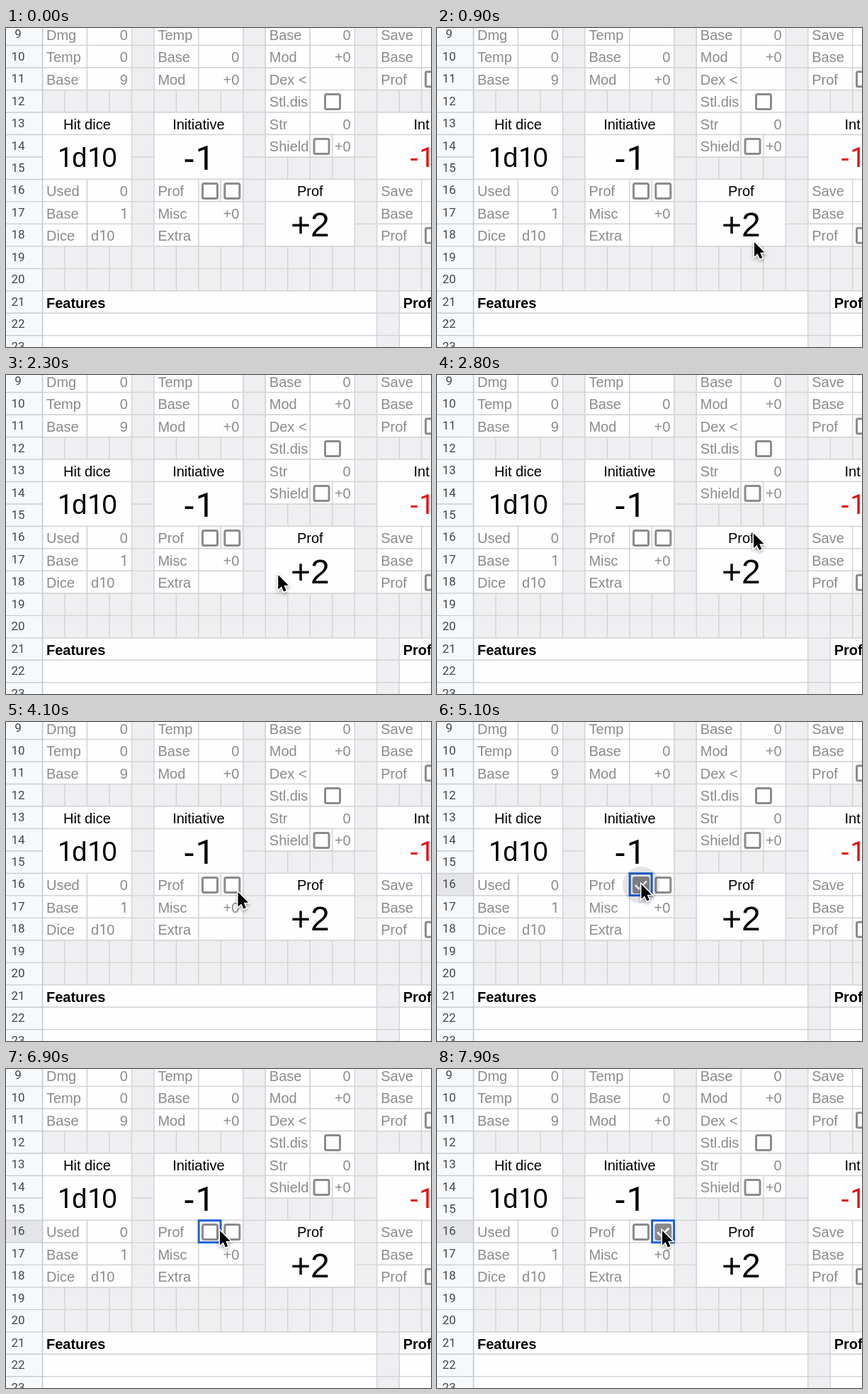
An HTML page with a canvas for the animation above (8 s loop, 600x450 px).

```html
<!DOCTYPE html>
<html lang="en">
<head>
<meta charset="utf-8">
<title>Character sheet</title>
<style>
html, body { margin: 0; width: 100%; height: 100%; overflow: hidden; background: #fff; }
canvas { display: block; width: 600px; height: 450px; }
</style>
</head>
<body>
<canvas id="stage" width="600" height="450"></canvas>
<script>
const ctx = document.getElementById('stage').getContext('2d');
const LOOP = 8000, STEP = 100, CELL = 31.48;
const WHITE = '#fefdff', EMPTY = '#efeef0', LINE = '#d3d2d4';
const GRAY = '#8b8b8b', BLACK = '#000', RED = '#ea0b0b', BLUE = '#1b62d8';
const SANS = '"Liberation Sans", Arial, sans-serif';
const ROBOTO = 'Roboto, sans-serif';

const colX = c => 51.5 + c * CELL;
const rowY = r => 119 + (r - 13) * CELL;
const midY = r => rowY(r) + CELL / 2;

function fill(c0, r0, c1, r1, color = WHITE) {
  ctx.fillStyle = color;
  ctx.fillRect(colX(c0), rowY(r0), colX(c1) - colX(c0), rowY(r1) - rowY(r0));
}

function line(x0, y0, x1, y1) {
  ctx.beginPath();
  ctx.moveTo(x0, y0);
  ctx.lineTo(x1, y1);
  ctx.stroke();
}

// White merged cell with its border.
function cell(c0, r0, c1 = c0 + 1, r1 = r0 + 1) {
  fill(c0, r0, c1, r1);
  ctx.strokeRect(colX(c0), rowY(r0), colX(c1) - colX(c0), rowY(r1) - rowY(r0));
}

// The digit 1 is set in Roboto, whose 1 has no foot.
function text(str, x, y, { size = 20, color = GRAY, align = 'left', weight = 400 } = {}) {
  const sans = `${weight} ${size}px ${SANS}`;
  ctx.font = sans;
  ctx.fillStyle = color;
  ctx.textAlign = 'left';
  const width = ctx.measureText(str).width;
  if (align === 'center') x -= width / 2;
  if (align === 'right') x -= width;
  for (const part of str.split(/(1)/)) {
    if (!part) continue;
    ctx.font = sans;
    const advance = ctx.measureText(part).width;
    const one = part === '1';
    if (one) ctx.font = `${weight} ${size}px ${ROBOTO}`;
    ctx.fillText(part, x + (one ? size * 0.02 : 0), y);
    x += advance;
  }
}

const label = (str, c, r, opt) => text(str, colX(c) + 5.5, midY(r) + 8, opt);
const value = (str, c, r) => text(str, colX(c) - 5.5, midY(r) + 8, { align: 'right' });
const title = (str, c, r) => text(str, colX(c), midY(r) + 8, { color: BLACK, align: 'center' });
const big = (str, c, y, size, color = BLACK) => text(str, colX(c), y, { size, color, align: 'center' });

// Label and value pair, four columns wide.
function entry(c, r, name, val = '') {
  cell(c, r, c + 2);
  cell(c + 2, r, c + 4);
  label(name, c, r);
  value(val, c + 4, r);
}

function card(c, r, name) {
  cell(c, r, c + 4);
  cell(c, r + 1, c + 4, r + 3);
  title(name, c + 2, r);
}

function checkbox(x, y, checked = false) {
  ctx.beginPath();
  ctx.roundRect(x - 10.5, y - 10.5, 21, 21, 2);
  ctx.lineWidth = 3;
  ctx.lineJoin = 'round';
  ctx.strokeStyle = GRAY;
  ctx.stroke();
  if (checked) {
    ctx.fillStyle = GRAY;
    ctx.fill();
    ctx.beginPath();
    ctx.moveTo(x - 8, y);
    ctx.lineTo(x - 3, y + 5.5);
    ctx.lineTo(x + 8, y - 5.5);
    ctx.strokeStyle = WHITE;
    ctx.lineWidth = 2.8;
    ctx.lineJoin = 'miter';
    ctx.stroke();
  }
  gridPen();
}

function gridPen() {
  ctx.strokeStyle = LINE;
  ctx.lineWidth = 1.4;
  ctx.lineJoin = 'miter';
}

function rowHeaders(active) {
  ctx.fillStyle = '#f6f9fb';
  ctx.fillRect(0, 0, 51.5, 450);
  if (active) {
    ctx.fillStyle = '#e3e5e8';
    ctx.fillRect(0, rowY(active), 51.5, CELL);
  }
  for (let r = 9; r <= 23; r++) {
    ctx.strokeStyle = '#c9cbcd';
    line(0, rowY(r), 51.5, rowY(r));
    ctx.font = `400 17px ${ROBOTO}`;
    ctx.textAlign = 'center';
    ctx.fillStyle = '#444648';
    ctx.fillText(r, 17, midY(r) + 5.3);
  }
  ctx.strokeStyle = '#c4c6c8';
  line(51.5, 0, 51.5, 450);
}

function sheet(s) {
  gridPen();
  ctx.fillStyle = EMPTY;
  ctx.fillRect(0, 0, 600, 450);
  for (let c = 0; c < 18; c++) line(colX(c), 0, colX(c), 450);
  for (let r = 9; r < 24; r++) line(51, rowY(r), 600, rowY(r));

  entry(0, 9, 'Dmg', '0');
  entry(0, 10, 'Temp', '0');
  entry(0, 11, 'Base', '9');
  card(0, 13, 'Hit dice');
  big('1d10', 2, 196, 38);
  entry(0, 16, 'Used', '0');
  entry(0, 17, 'Base', '1');
  entry(0, 18, 'Dice');
  label('d10', 2, 18);

  entry(5, 9, 'Temp');
  entry(5, 10, 'Base', '0');
  entry(5, 11, 'Mod', '+0');
  card(5, 13, 'Initiative');
  big(s.initiative, 7, 200, 48);
  entry(5, 16, 'Prof');
  cell(7, 16);
  cell(8, 16);
  checkbox(288, 230, s.first);
  checkbox(319.3, 230, s.second);
  entry(5, 17, 'Misc', '+0');
  entry(5, 18, 'Extra');

  entry(10, 9, 'Base', '0');
  entry(10, 10, 'Mod', '+0');
  entry(10, 11, 'Dex <');
  entry(10, 12, 'Stl.dis');
  checkbox(461, 104);
  entry(10, 13, 'Str', '0');
  entry(10, 14, 'Shield', '+0');
  cell(12, 14);
  checkbox(445.5, 167);
  card(10, 16, 'Prof');
  big('+2', 12, 294, 48);

  for (const top of [9, 16]) {
    entry(15, top, 'Save');
    entry(15, top + 1, 'Base');
    entry(15, top + 2, 'Prof');
    checkbox(603, midY(top + 2) + 0.5);
  }
  card(15, 13, 'Int');
  big('-1', 17, 196, 38, RED);

  for (let r = 21; r < 24; r++) {
    cell(0, r, 15);
    cell(16, r, 20);
  }
  fill(15, 21, 16, 24, EMPTY);
  for (let r = 21; r < 24; r++) line(colX(15), rowY(r), colX(16), rowY(r));
  line(colX(15), rowY(21), colX(15), 450);
  line(colX(16), rowY(21), colX(16), 450);
  const bold = { color: BLACK, weight: 700 };
  label('Features', 0, 21, bold);
  label('Prof', 16, 21, bold);

  rowHeaders(s.selected ? 16 : 0);
}

function selection(c, handle) {
  const x = colX(c), y = rowY(16);
  ctx.strokeStyle = BLUE;
  ctx.lineWidth = 3;
  ctx.lineJoin = 'miter';
  ctx.strokeRect(x + 0.3, y + 0.3, CELL - 0.6, CELL - 0.6);
  if (handle) {
    ctx.fillStyle = BLUE;
    ctx.fillRect(x + CELL - 4.5, y + CELL - 4.5, 8.5, 8.5);
  }
}

function ripple(x, radius, alpha) {
  ctx.fillStyle = `rgba(0,0,0,${alpha})`;
  ctx.beginPath();
  ctx.arc(x, 230, radius, 0, 2 * Math.PI);
  ctx.fill();
}

// Pointer path: time, x, y of the tip.
const PATH = [
  [300, 503, 368], [600, 476, 329], [900, 448, 302], [1100, 442, 299],
  [1200, 428, 309], [1300, 402, 308], [1400, 384, 290], [1500, 383, 262],
  [1600, 405, 241], [1700, 438, 234], [1800, 456, 247], [1900, 460, 268],
  [2000, 449, 289], [2200, 403, 297], [2400, 374, 262], [2600, 396, 230],
  [2800, 447, 223.5], [2900, 459, 237], [3000, 464, 251], [3300, 452, 283],
  [3700, 452, 283], [3900, 413, 268], [4100, 327.5, 240], [4300, 297, 232],
  [4500, 288.5, 229], [6700, 288.5, 229], [6900, 302, 228], [7100, 312, 218],
  [7300, 317, 221], [7500, 318, 228]
];

// Slope at a key; zero at the ends and beside a pause.
function slope(i, axis) {
  const a = PATH[i - 1], b = PATH[i], c = PATH[i + 1];
  if (!a || !c || a[1] === b[1] || b[1] === c[1]) return 0;
  return (c[axis] - a[axis]) / (c[0] - a[0]);
}

function tipAt(t) {
  const last = PATH.length - 1;
  if (t >= PATH[last][0]) return PATH[last].slice(1);
  const i = PATH.findIndex(p => p[0] > t) - 1;
  const a = PATH[i], b = PATH[i + 1];
  const span = b[0] - a[0], u = (t - a[0]) / span, v = 1 - u;
  return [1, 2].map(k =>
    v * v * ((1 + 2 * u) * a[k] + u * span * slope(i, k)) +
    u * u * ((3 - 2 * u) * b[k] - v * span * slope(i + 1, k)));
}

function pointer(t) {
  if (t < PATH[0][0]) return;
  const [x, y] = tipAt(t);
  const arrow = new Path2D('M0 0V16.2L3.7 12.7L6.2 18.6L8.9 17.4L6.4 11.6H11.5Z');
  ctx.save();
  ctx.translate(x, y);
  ctx.scale(1.27, 1.27);
  ctx.lineJoin = 'miter';
  ctx.lineWidth = 2.4;
  ctx.strokeStyle = '#fff';
  ctx.shadowColor = 'rgba(0,0,0,.35)';
  ctx.shadowBlur = 4;
  ctx.shadowOffsetY = 2;
  ctx.stroke(arrow);
  ctx.shadowColor = 'transparent';
  ctx.fillStyle = '#000';
  ctx.fill(arrow);
  ctx.restore();
}

function draw(t) {
  const within = (a, b) => t >= a && t < b;
  sheet({
    selected: t >= 5100,
    first: within(5100, 6500),
    second: t >= 7800,
    initiative: within(5300, 6600) ? '1' : '-1'
  });
  if (t >= 5100) selection(t < 7800 ? 7 : 8, within(5300, 6500));
  if (within(5100, 5200)) ripple(288, 26, 0.1);
  if (within(5200, 5300)) ripple(288, 34, 0.05);
  if (within(6500, 6600)) ripple(288, 34, 0.08);
  if (within(7800, 7900)) ripple(319.3, 34, 0.08);
  pointer(t);
}

const start = performance.now();
let shown = -1;
function tick() {
  const now = (performance.now() - start) % LOOP;
  const t = Math.floor(now / STEP) * STEP;
  if (t !== shown) draw(shown = t);
  requestAnimationFrame(tick);
}
tick();
</script>
</body>
</html>
```
